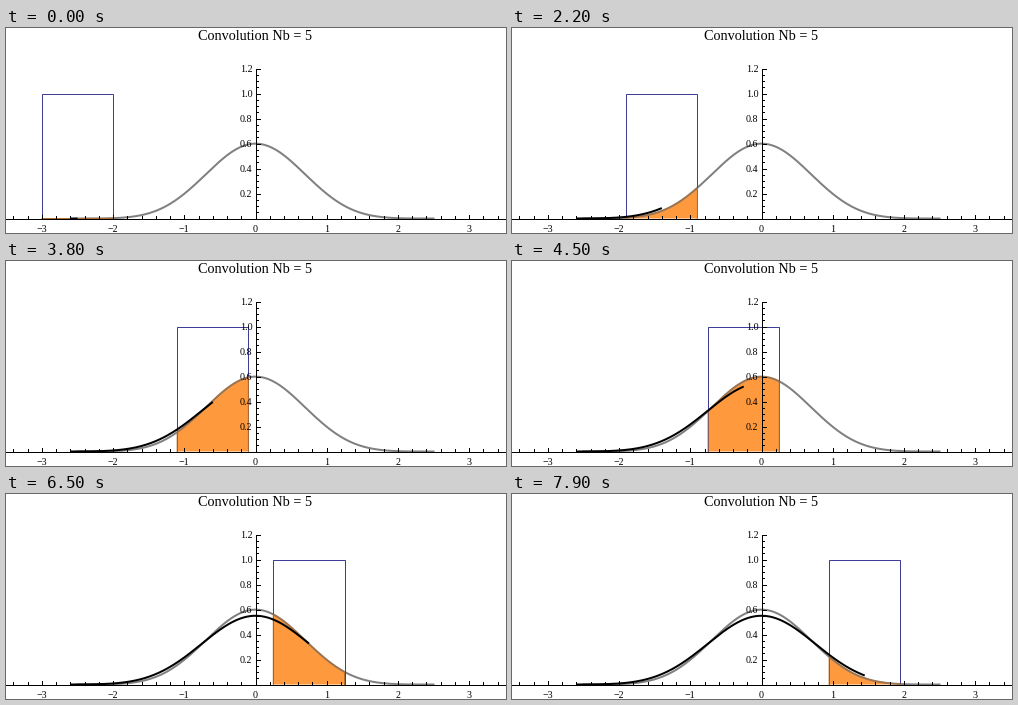
Recreate the animation shown at these times as a matplotlib script. Size 500x205 px, loop 8000 ms.

```python
from math import comb, factorial

import matplotlib.pyplot as plt
import numpy as np
from matplotlib.animation import FuncAnimation
from matplotlib.patches import Rectangle

W, H, DPI = 500, 205, 80
PX = 72 / DPI                      # one pixel in points
X0, Y0, SX, SY = 249.5, 190.5, 71.2, 125.0
STEPS, STEP = 80, 0.05
ORDER = 5

plt.rcParams["font.family"] = "Liberation Serif"


def px(x):
    return X0 + SX * np.asarray(x, float)


def py(y):
    return Y0 - SY * np.asarray(y, float)


def box_power(x, n):
    """Unit box convolved with itself to n factors, centred on zero."""
    x = -np.abs(np.asarray(x, float))
    total = sum((-1) ** k * comb(n, k) * np.maximum(x + n / 2 - k, 0) ** (n - 1)
                for k in range(n + 1))
    return total / factorial(n - 1)


fig = plt.figure(figsize=(W / DPI, H / DPI), dpi=DPI, facecolor="white")
ax = fig.add_axes([0, 0, 1, 1])
ax.set(xlim=(0, W), ylim=(H, 0))
ax.axis("off")


def line(x=(), y=(), color="black", width=1.0, z=1, **kw):
    return ax.plot(x, y, color=color, lw=width * PX, zorder=z, **kw)[0]


def label(x, y, text, size=10, ha="center"):
    ax.text(x, y, text, fontsize=size * PX, ha=ha, va="center_baseline", zorder=9)


def draw_axes():
    line([-2, W + 2], [Y0, Y0], z=8)
    line([X0, X0], [py(1.2), Y0], z=8)
    for i in range(-17, 18):
        x, size = px(i / 5), 4 if i % 5 == 0 else 2.5
        line([x, x], [Y0, Y0 - size], z=8)
    for i in range(1, 25):
        y, size = py(i / 20), 4 if i % 4 == 0 else 2.5
        line([X0, X0 + size], [y, y], z=8)
    for i in range(-3, 4):
        label(px(i), 200, str(i).replace("-", "\u2212"))
    for i in range(1, 7):
        label(246.5, py(i / 5), f"{i / 5:.1f}", ha="right")


draw_axes()
label(249.5, 7.5, f"Convolution Nb = {ORDER}", size=14.3)

grid = np.linspace(-2.5, 2.5, 400)
curve = line(px(grid), py(box_power(grid, ORDER)), "#808080", 2, z=2)
box = line(color=(0.25, 0.24, 0.6), z=3, solid_joinstyle="miter")
area = ax.fill([0], [0], color="#ff993d", lw=0, zorder=1)[0]
rim = line(color="#b56d2c", z=4)
result = line(z=5, width=2, solid_capstyle="butt")

# Strokes lying on the baseline must not spill below the axis.
above = Rectangle((0, 0), W, Y0 + 0.5, transform=ax.transData)
for artist in (curve, result):
    artist.set_clip_path(above)


def update(i):
    left = -3 + STEP * i
    right, mid = left + 1, left + 0.5
    box.set_data(px([left, left, right, right]), py([0, 1, 1, 0]))

    xs = np.linspace(left, right, 80)
    xs = np.concatenate(([left], xs, [right]))
    ys = box_power(xs, ORDER)
    ys[[0, -1]] = 0
    outline = np.column_stack((px(xs), py(ys)))
    area.set_xy(outline)
    rim.set_data(*outline.T)

    xs = np.linspace(-2.6, max(mid, -2.6), 200)
    result.set_data(px(xs), py(box_power(xs, ORDER + 1)))
    return box, area, rim, result


anim = FuncAnimation(fig, update, frames=STEPS, interval=100,
                     repeat=True, repeat_delay=0, blit=False)
plt.show()
```
